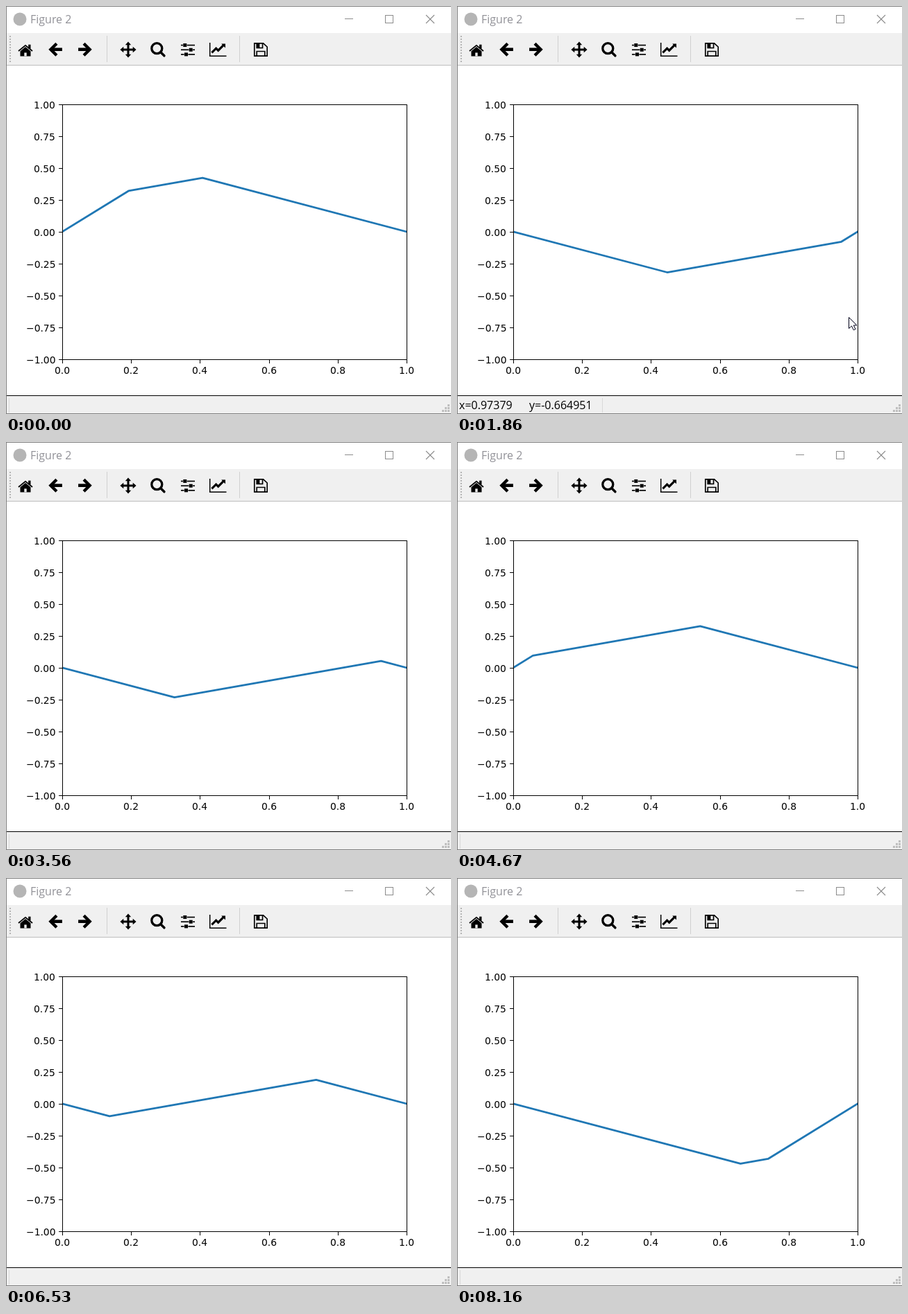
Animation, 641 px wide and 589 px high, one loop 8.23 s. Source, as an HTML page with a canvas:

```html
<!DOCTYPE html>
<html lang="en">
<head>
<meta charset="utf-8">
<title>Figure 2</title>
<style>
html, body { margin: 0; width: 100%; height: 100%; overflow: hidden; background: #fff; }
canvas { display: block; }
</style>
</head>
<body>
<canvas id="stage" width="641" height="589"></canvas>
<script>
const ctx = document.getElementById('stage').getContext('2d');
const LOOP = 8230, STEP = 64.8, LAST = 126;

// Plot geometry in pixels
const LEFT = 81, WIDTH = 496, ZERO = 325.885, UNIT = 183.645;
const UI_FONT = '16px "Open Sans", "Noto Sans", sans-serif';
const TICK_FONT = '13.89px "DejaVu Sans", sans-serif';

// Plucked string: triangle with its peak at PEAK, travelling both ways
const PEAK = 0.3, HEIGHT = 0.5;
// The playback speed wavers a little: [step, distance travelled]
const PACE = [[0, 0.1075], [29, 0.747], [55, 1.374], [72, 1.757], [101, 2.4375], [LAST, 3.04]];

function rect(color, x, y, w, h) {
  ctx.fillStyle = color;
  ctx.fillRect(x, y, w, h);
}

function trace(points, close) {
  ctx.beginPath();
  for (let i = 0; i < points.length; i += 2) ctx.lineTo(points[i], points[i + 1]);
  if (close) ctx.closePath();
}

function line(color, width, ...points) {
  trace(points);
  ctx.strokeStyle = color;
  ctx.lineWidth = width;
  ctx.stroke();
}

function fill(color, ...points) {
  trace(points, true);
  ctx.fillStyle = color;
  ctx.fill();
}

function text(str, x, y, font, color) {
  ctx.font = font;
  ctx.fillStyle = color;
  ctx.fillText(str, x, y);
}

// Tick label on whole pixels; align is the share of its width left of x
function label(str, x, y, align) {
  ctx.font = TICK_FONT;
  const left = Math.round(x - align * ctx.measureText(str).width);
  text(str, left, Math.round(y), TICK_FONT, '#000');
}

// Runs draw with the origin moved to x, y
function at(x, y, draw) {
  ctx.save();
  ctx.translate(x, y);
  draw();
  ctx.restore();
}

function distance(n) {
  const i = Math.max(1, PACE.findIndex(key => key[0] >= n));
  const [n0, s0] = PACE[i - 1], [n1, s1] = PACE[i];
  return s0 + (s1 - s0) * (n - n0) / (n1 - n0);
}

// Odd, 2-periodic extension of the initial triangle
function pluck(x) {
  x -= 2 * Math.round(x / 2);
  const d = Math.abs(x);
  const h = d < PEAK ? HEIGHT * d / PEAK : HEIGHT * (1 - d) / (1 - PEAK);
  return Math.sign(x) * h;
}

const fold = x => Math.abs(x - 2 * Math.round(x / 2));

function drawString(s) {
  const kinks = [0, fold(PEAK - s), fold(PEAK + s), 1].sort((a, b) => a - b);
  const points = kinks.flatMap(x => {
    const u = (pluck(x + s) + pluck(x - s)) / 2;
    return [LEFT + WIDTH * x, ZERO - UNIT * u];
  });
  ctx.save();
  ctx.beginPath();
  ctx.rect(LEFT, 142, WIDTH, 368);
  ctx.clip();
  ctx.lineJoin = 'round';
  ctx.lineCap = 'square';
  line('#1f77b4', 2.78, ...points);
  ctx.restore();
}

function drawAxes() {
  ctx.strokeStyle = '#000';
  ctx.lineWidth = 1;
  ctx.strokeRect(81.5, 142.5, WIDTH, 368);
  for (let v = -1; v <= 1; v += 0.25) {
    const y = ZERO - UNIT * v;
    rect('#000', 76, Math.round(y), 5, 1);
    label(v.toFixed(2).replace('-', '\u2212'), 71.28, y + 6, 1);
  }
  for (let i = 0; i <= 5; i++) {
    const x = LEFT + WIDTH * i / 5;
    rect('#000', Math.round(x), 511, 1, 5);
    label((i / 5).toFixed(1), x, 531, 0.5);
  }
}

function homeIcon() {
  line('#000', 1.8, -10, 1.8, 0, -6.4, 10, 1.8);
  rect('#000', 4.2, -7.5, 3.3, 6);
  fill('#000', 0, -4.2, 7.5, 2.1, 7.5, 9.2, -7.5, 9.2, -7.5, 2.1);
  rect('#f0f0f0', -1.7, 4.2, 3.4, 5);
}

function arrowIcon(dir) {
  ctx.scale(dir, 1);
  line('#000', 4.4, 1.6, -8.5, -6.9, 0, 1.6, 8.5);
  line('#000', 4.6, -6, 0, 9.6, 0);
}

function moveIcon() {
  for (let i = 0; i < 4; i++) {
    ctx.rotate(Math.PI / 2);
    rect('#000', -1.5, -8, 3, 8);
    fill('#000', 0, -11.6, 4.2, -6.7, -4.2, -6.7);
  }
}

function zoomIcon() {
  ctx.beginPath();
  ctx.arc(0, 0, 7.5, 0, 2 * Math.PI);
  ctx.strokeStyle = '#000';
  ctx.lineWidth = 3.3;
  ctx.stroke();
  ctx.lineCap = 'round';
  line('#000', 3.5, 5.5, 5.5, 10.6, 10.6);
}

function slidersIcon() {
  [-6.7, 1.7, -5].forEach((x, i) => {
    const y = 6.67 * (i - 1);
    rect('#000', -10, y - 0.8, 20, 1.67);
    rect('#f0f0f0', x - 0.4, y - 2.5, 5.8, 5);
    rect('#000', x, y - 2.5, 5, 5);
  });
}

function chartIcon() {
  line('#000', 1.5, 0.7, 0, 0.7, 19.3, 24.5, 19.3);
  line('#000', 3.1, 3.4, 14.3, 9.6, 8.1, 12.7, 11.2, 20.5, 3.4);
  fill('#000', 23, 1.5, 17.2, 1.5, 23, 7.4);
}

function saveIcon() {
  line('#000', 1.67, 0.8, 0.8, 13.6, 0.8, 19.2, 6, 19.2, 19.2, 0.8, 19.2, 0.8, 0);
  line('#000', 1.67, 4.2, 19, 4.2, 12.5, 15.8, 12.5, 15.8, 19);
  rect('#000', 3.4, 0.8, 10, 7.5);
  rect('#f0f0f0', 8.4, 1.7, 3.3, 5);
}

function drawToolbar() {
  rect('#f0f0f0', 1, 39, 640, 46);
  rect('#bdbdbd', 1, 85, 640, 1);
  for (let y = 43; y < 82; y += 4) rect('#b4b4b4', 5, y, 2, 2);
  for (const x of [145, 336]) rect('#d0d0d0', x, 43, 1, 38);

  at(28, 63.2, homeIcon);
  at(71.3, 62.7, () => arrowIcon(1));
  at(113.7, 62.7, () => arrowIcon(-1));
  at(176, 63, moveIcon);
  at(217.3, 61.2, zoomIcon);
  at(262, 63.2, slidersIcon);
  at(293, 53, chartIcon);
  at(357, 53, saveIcon);
}

function drawTitleBar() {
  ctx.beginPath();
  ctx.arc(20, 19, 9.5, 0, 2 * Math.PI);
  ctx.fillStyle = '#b5b5b5';
  ctx.fill();
  text('Figure 2', 35, 25, UI_FONT, '#929298');
  const ink = '#8c8c8c';
  rect(ink, 488, 18, 12, 1);
  ctx.strokeStyle = ink;
  ctx.lineWidth = 1;
  ctx.strokeRect(546.5, 13.5, 11, 11);
  line(ink, 1.1, 605, 13, 617, 25);
  line(ink, 1.1, 617, 13, 605, 25);
}

function drawStatus(pointer) {
  rect('#000', 1, 562, 640, 1);
  rect('#f0f0f0', 1, 563, 640, 25);
  for (let r = 0; r < 3; r++)
    for (let c = 2 - r; c < 3; c++) rect('#bfbfbf', 628 + 4 * c, 575 + 4 * r, 3, 3);

  const inside = pointer && pointer.x <= 577 && pointer.y <= 510;
  rect('#d9d9d9', inside ? 209 : 4, 566, 1, 21);
  if (!inside) return;
  const x = (pointer.x - LEFT) / WIDTH;
  const y = (510.53 - pointer.y) / UNIT - 1;
  text('x=' + +x.toPrecision(6), 3, 582, UI_FONT, '#000');
  text('y=' + +y.toPrecision(6), 104, 582, UI_FONT, '#000');
}

// Glides in from below, rests, then swings out to the lower right
function pointerAt(n) {
  if (n < 10 || n > 54) return null;
  const before = Math.max(0, (15 - n) / 5);
  const after = Math.max(0, (n - 47) / 7);
  return {
    x: Math.round(564 + 2 * before + 30 * Math.sin(after * Math.PI / 2)),
    y: Math.round(449 + 69 * before ** 2 + 127 * after ** 2)
  };
}

function drawPointer() {
  trace([0, 0, 0, 16, 4, 12.5, 6.8, 18.3, 9.5, 17, 6.8, 11.5, 11.5, 11.5], true);
  ctx.fillStyle = '#fff';
  ctx.fill();
  ctx.strokeStyle = '#000018';
  ctx.lineWidth = 1;
  ctx.stroke();
}

function draw(t) {
  const n = Math.min(LAST, Math.floor((t + 20) / STEP));
  const pointer = pointerAt(n);

  rect('#fff', 0, 0, 641, 589);
  drawTitleBar();
  drawToolbar();
  drawString(distance(n));
  drawAxes();
  drawStatus(pointer);

  rect('#808080', 0, 0, 641, 1);
  rect('#808080', 0, 0, 1, 589);
  rect('#808080', 0, 588, 641, 1);
  if (pointer) at(pointer.x + 0.5, pointer.y + 0.5, drawPointer);
}

const start = performance.now();
function tick() {
  draw((performance.now() - start) % LOOP);
  requestAnimationFrame(tick);
}
tick();
</script>
</body>
</html>
```
